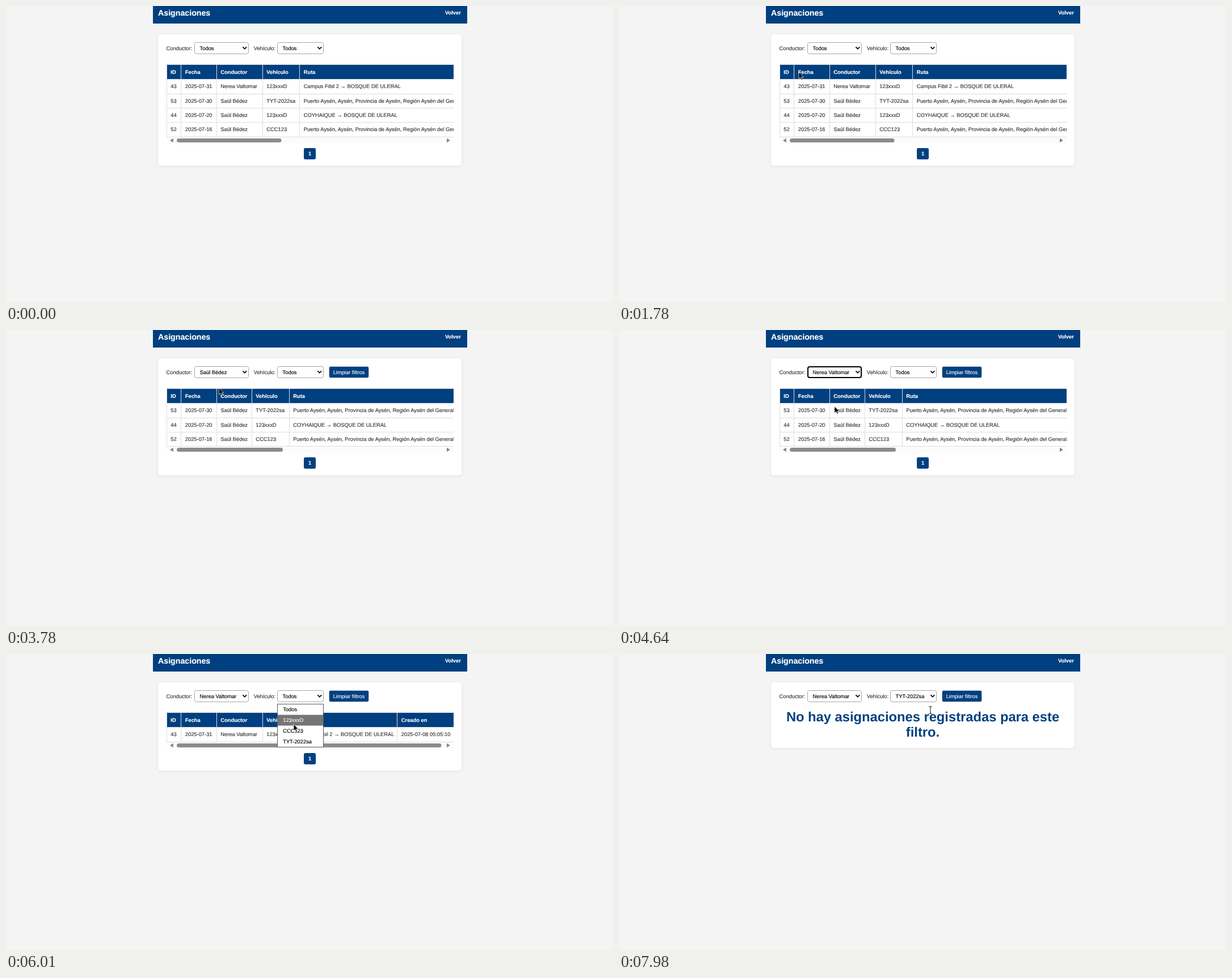
An HTML page for the animation above (8 s loop, 1070 by 523 pixels).

```html
<!DOCTYPE html>
<html lang="es">
<head>
<meta charset="utf-8">
<title>Asignaciones</title>
<style>
  html, body { margin: 0; width: 100%; height: 100%; overflow: hidden; background: #f4f4f4; }
  svg { display: block; width: 100vw; height: 100vh; }
  text {
    --ink: #333;
    font: 9.34px "Liberation Sans", Arial, sans-serif;
    fill: var(--ink); stroke: var(--ink); stroke-width: .15px;
    text-rendering: geometricPrecision; white-space: pre;
  }
  .bold { font-weight: bold; }
  .light { --ink: #fff; }
  .dark { --ink: #000; }
  .mid { text-anchor: middle; }
  .title { font-size: 14.2px; }
  .notice { --ink: #004080; font-size: 23.73px; stroke: none; }
  .card { filter: drop-shadow(0 1.3px 2.7px rgba(0, 0, 0, .07)); }
</style>
</head>
<body>
<svg viewBox="0 0 1070 523" xmlns="http://www.w3.org/2000/svg">
  <defs><clipPath id="tableClip"><rect x="282" y="100" width="507" height="160"/></clipPath></defs>
  <g id="page"></g>
  <g id="pointer">
    <path id="arrow" d="M0 0V11.6L2.7 9.2 4.6 13.5 6.5 12.7 4.6 8.5H8.2Z" fill="#000" stroke="#fff" stroke-width=".7"/>
    <path id="beam" d="M-2.8 -6.2H-.7L0 -5.6 .7 -6.2H2.8M0 -5.6V5.6M-2.8 6.2H-.7L0 5.6 .7 6.2H2.8" fill="none" stroke="#222" stroke-width="1.1"/>
  </g>
</svg>
<script>
const LOOP = 8000, BLUE = '#004080', LINE = '#ddd';
const WOMAN = 'Nerea Valtomar', MAN = 'Saúl Bédez';
const DRIVERS = ['Todos', MAN, WOMAN];
const VEHICLES = ['Todos', '123xxxD', 'CCC123', 'TYT-2022sa'];
const TOWN = 'Puerto Aysén, Aysén, Provincia de Aysén, Región Aysén del General';
const FOREST = 'BOSQUE DE ULERAL';
const HEADS = ['ID', 'Fecha', 'Conductor', 'Vehículo', 'Ruta', 'Creado en'];
const ROWS = [
  ['43', '2025-07-31', WOMAN, '123xxxD', `Campus Fibil 2 → ${FOREST}`, '2025-07-08 05:05:10'],
  ['53', '2025-07-30', MAN, 'TYT-2022sa', TOWN],
  ['44', '2025-07-20', MAN, '123xxxD', `COYHAIQUE → ${FOREST}`],
  ['52', '2025-07-16', MAN, 'CCC123', TOWN]
];
const VIEWS = {
  all: { rows: ROWS, edges: [283, 308.5, 371, 452, 517.5], thumb: 184.5 },
  man: { rows: ROWS.slice(1), edges: [283, 308.5, 371, 433, 499], thumb: 187 },
  woman: { rows: ROWS.slice(0, 1), edges: [283, 308.5, 371, 452, 506, 689.5], thumb: 466.5 },
  empty: null
};
const SELECTS = {
  driver: { x: 332, width: 96, options: DRIVERS },
  vehicle: { x: 478, width: 82, options: VEHICLES }
};

// Each entry changes only the listed parts of the page.
const EVENTS = [
  [0, { view: 'all', driver: 0, vehicle: 0, open: '', ring: '', hot: 0 }],
  [2300, { open: 'driver' }],
  [2690, { hot: 1 }],
  [3000, { open: '', driver: 1, ring: 'driver' }],
  [3250, { view: 'man', ring: '' }],
  [4000, { open: 'driver' }],
  [4220, { hot: 2 }],
  [4450, { open: '', driver: 2, ring: 'driver' }],
  [4750, { view: 'woman', ring: '' }],
  [5560, { open: 'vehicle', hot: 0 }],
  [5790, { hot: 1 }],
  [6400, { hot: 2 }],
  [6550, { open: '', vehicle: 2, ring: 'vehicle' }],
  [6740, { view: 'empty', ring: '' }],
  [7200, { open: 'vehicle' }],
  [7450, { hot: 3 }],
  [7700, { open: '', vehicle: 3, ring: 'vehicle' }],
  [7850, { ring: '' }]
];

// time, x, y of the pointer tip
const PATH = [
  [90, 1044, 490], [400, 640, 250], [650, 250, 130], [880, 300, 30],
  [1130, 480, 90], [1330, 545, 235], [1500, 420, 215], [1640, 310, 150],
  [1780, 317, 117], [2200, 366, 84], [2370, 369, 83], [2600, 369, 83],
  [2790, 369, 118], [3100, 369, 118], [3400, 374, 116], [3680, 374, 116],
  [3930, 378, 78], [4060, 378, 80], [4340, 380, 138], [4450, 380, 135],
  [4660, 380, 135], [5300, 506, 78], [5600, 506, 78], [6010, 507, 124],
  [6330, 507, 124], [6470, 507, 133], [6710, 507, 133], [6860, 507, 80],
  [7240, 508, 80], [7540, 530, 150], [7700, 532, 150], [7960, 549, 99]
];

const label = (x, y, text, cls = '') => `<text x="${x}" y="${y}" class="${cls}">${text}</text>`;
const box = (x, y, w, h, fill, extra = '') =>
  `<rect x="${x}" y="${y}" width="${w}" height="${h}" fill="${fill}" ${extra}/>`;

function drawSelect(name, state) {
  const { x, width, options } = SELECTS[name];
  const ring = state.ring === name;
  const stroke = ring ? 'stroke="#000" stroke-width="2"' : 'stroke="#a6a6a6"';
  const inset = ring ? 1 : .5, right = x + width;
  return box(x + inset, 64 + inset, width - 2 * inset, 21 - 2 * inset, '#fff', `rx="3" ${stroke}`) +
    label(x + 9.6, 77.8, options[state[name]], 'dark') +
    `<path d="M${right - 10.6} 72.4l3.4 3.5 3.4 -3.5" fill="none" stroke="#000" stroke-width="1.7"/>`;
}

function drawPopup(name, hot) {
  const { x, width, options } = SELECTS[name];
  const items = options.map((text, i) => {
    const y = 88.5 + 19 * i;
    return (i === hot ? box(x + .5, y, width - 1, 19, '#767474') : '') +
      label(x + 10.2, y + 12.9, text, i === hot ? 'light' : 'dark');
  }).join('');
  const height = options.length * 19;
  return box(x, 88.5, width, height, '#fff') + items +
    box(x + .5, 88.5, width - 1, height, 'none', 'stroke="#555"');
}

function drawTable({ rows, edges, thumb }) {
  const top = 104, rowHeight = 25.3, rowTop = r => Math.round(top + r * rowHeight);
  const bottom = rowTop(rows.length + 1);
  let out = box(283, top, 507, rowTop(1) - top, BLUE) + box(283, top - 1, 507, 1, LINE);
  [HEADS, ...rows].forEach((cells, r) => {
    edges.forEach((x, c) => {
      out += label(x + 7.3, top + r * rowHeight + 16.1, cells[c] || '', r ? '' : 'bold light');
    });
    out += box(283, rowTop(r + 1), 507, 1, LINE);
  });
  edges.forEach(x => out += box(Math.floor(x), top, 1, bottom - top, LINE));

  const bar = bottom + 6.5;
  return `<g clip-path="url(#tableClip)">${out}</g>` +
    box(283, bar - 5.5, 506, 11, '#fcfcfc') +
    box(301, bar - 3.5, thumb, 7, '#8b8b8b', 'rx="3.5"') +
    `<path d="M294.8 ${bar - 3.8}v7.6l-5.8 -3.8zM777 ${bar - 3.8}v7.6l5.8 -3.8z" fill="#858585"/>` +
    box(525, bottom + 20, 21, 20, BLUE, 'rx="2.7"') +
    label(535.5, bottom + 33.4, '1', 'bold light mid');
}

function drawPage(state) {
  const view = VIEWS[state.view];
  const cardBottom = view ? Math.round(180.7 + 25.3 * view.rows.length) : 166;
  return box(259, 0, 554, 31, BLUE) +
    label(268, 17.3, 'Asignaciones', 'bold light title') +
    label(774, 14.5, 'Volver', 'bold light') +
    box(268, 50, 535, cardBottom - 50, '#fff', 'rx="5.4" class="card"') +
    label(282.5, 77.6, 'Conductor:') + drawSelect('driver', state) +
    label(436.7, 77.6, 'Vehículo:') + drawSelect('vehicle', state) +
    (state.view === 'all' ? '' : box(569.5, 64.5, 70, 20, BLUE, 'rx="2.7" stroke="#ccc"') +
      label(604.4, 77.8, 'Limpiar filtros', 'light mid')) +
    (view ? drawTable(view) :
      label(535.5, 118.8, 'No hay asignaciones registradas para este', 'bold notice mid') +
      label(535.5, 146, 'filtro.', 'bold notice mid')) +
    (state.open ? drawPopup(state.open, state.hot) : '');
}

function pointerAt(time) {
  const next = PATH.findIndex(p => p[0] > time);
  if (next < 0) return PATH[PATH.length - 1].slice(1);
  if (next === 0) return PATH[0].slice(1);
  const [t0, x0, y0] = PATH[next - 1], [t1, x1, y1] = PATH[next];
  const k = (time - t0) / (t1 - t0), ease = k * k * (3 - 2 * k);
  return [x0 + (x1 - x0) * ease, y0 + (y1 - y0) * ease];
}

const [page, pointer, arrow, beam] = ['page', 'pointer', 'arrow', 'beam'].map(id => document.getElementById(id));
let shown = -1;

function render(time) {
  const past = EVENTS.filter(e => e[0] <= time);
  if (past.length !== shown) {
    shown = past.length;
    page.innerHTML = drawPage(Object.assign({}, ...past.map(e => e[1])));
  }
  const onText = time >= 7880;
  pointer.setAttribute('transform', `translate(${pointerAt(time).join(' ')})`);
  pointer.setAttribute('visibility', time < 90 ? 'hidden' : 'visible');
  arrow.style.display = onText ? 'none' : '';
  beam.style.display = onText ? '' : 'none';
}

const start = performance.now();
function tick() {
  render((performance.now() - start) % LOOP);
  requestAnimationFrame(tick);
}
tick();
</script>
</body>
</html>
```
